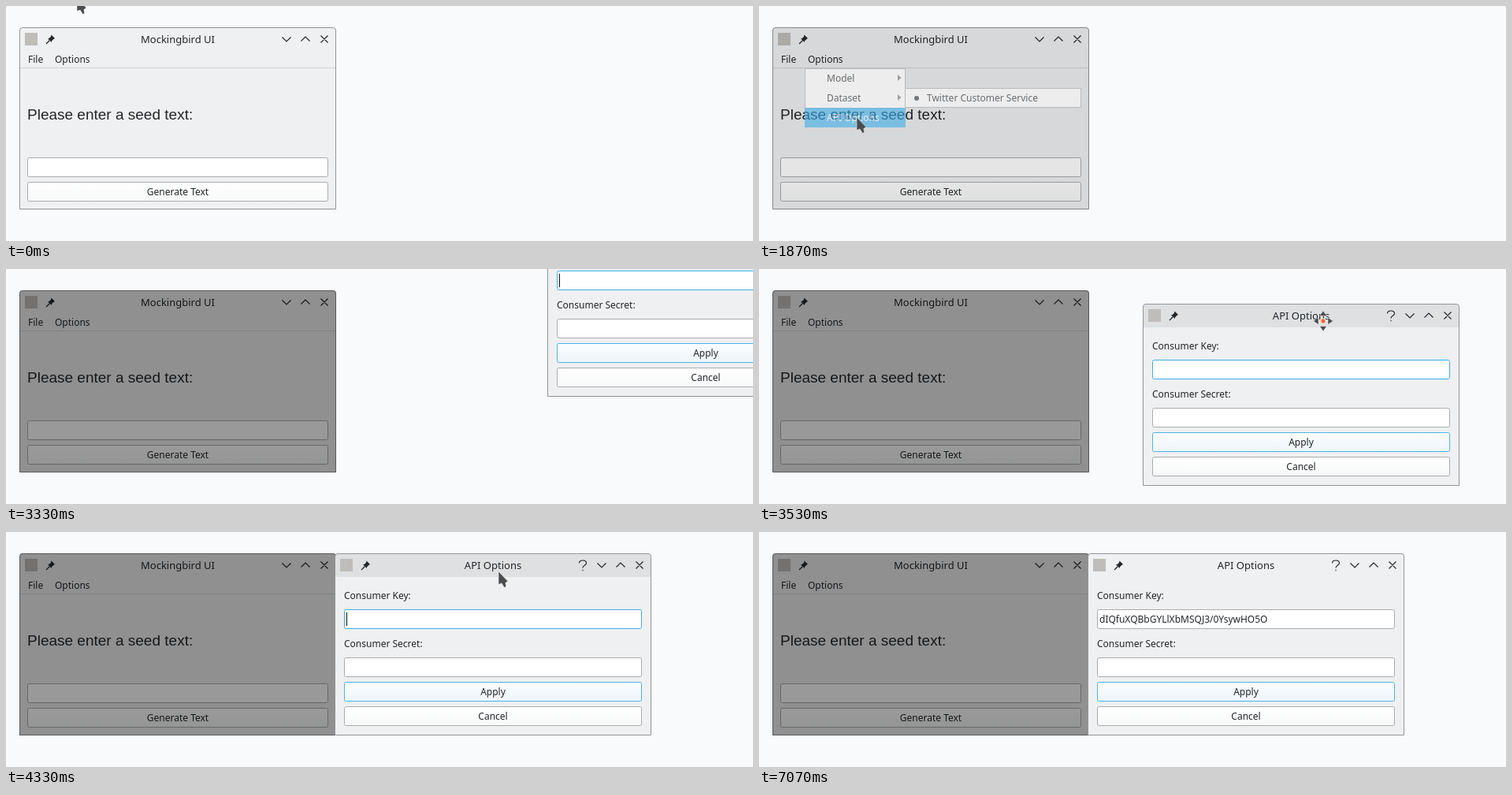
Write an HTML page that moves like this. It is 948x298 px and loops after 8 s.

```html
<!DOCTYPE html>
<html lang="en">
<head>
<meta charset="utf-8">
<title>API options dialog</title>
<style>
  html, body { margin: 0; width: 100%; height: 100%; overflow: hidden; background: #f9fafc; }
  svg { display: block; width: 948px; height: 298px; }
  text { font: 12px "Noto Sans", sans-serif; fill: #232629; white-space: pre; }
  .title { font-size: 13px; }
  .prompt { font: 19px "Liberation Sans", Arial, sans-serif; }
  .mid { text-anchor: middle; }
  .line { fill: none; stroke: #232629; stroke-width: 1.15; }
  .field { fill: #fff; stroke: #a9abad; }
  .button { fill: url(#plain); stroke: #a9abad; }
  .default { fill: url(#blue); stroke: #4db3e6; }
  .active .focus { stroke: #3daee9; }
  .bar { fill: #eff0f1; }
  .active .bar { fill: #dee0e2; }
  .caret { fill: #111; }
  .on { fill: #3daee9; }
  .back { fill: none; }
  .picked .back { fill: #3daee9; }
  .picked text { fill: #fcfcfc; }
  .picked .arrow { fill: #b9e0f6; }
  .arrow { fill: #7b7e81; }
  .popup { fill: #fcfcfc; stroke: #a5a8aa; }
  .ptr { fill: #4a4c4f; stroke: #fff; stroke-opacity: .6; stroke-width: .8; }
</style>
</head>
<body>
<svg id="stage" viewBox="0 0 948 298" xmlns="http://www.w3.org/2000/svg"></svg>
<script>
const FPS = 15, LOOP = 8000;

const text = (x, y, s, cls = '') => `<text x="${x}" y="${y}" class="${cls}">${s}</text>`;
const box = (x, y, w, h, cls) =>
  `<rect x="${x + .5}" y="${y + .5}" width="${w - 1}" height="${h - 1}" rx="2" class="${cls}"/>`;
const button = (x, y, w, s, cls) => box(x, y, w, 25, cls) + text(201, y + 17, s, 'mid');
const caret = (id, x, y) => `<rect id="${id}" x="${x}" y="${y}" width="1" height="17" class="caret"/>`;

const SHELL = 'M.5 230.5V4Q.5 .5 4 .5H398Q401.5 .5 401.5 4V230.5Z';

// Window frame, title bar and its buttons
const chrome = (title, help) => `
  <path d="${SHELL}" fill="#eff0f1"/>
  <path class="bar" d="M1 30V4Q1 1 4 1H398Q401 1 401 4V30Z"/>
  <path d="${SHELL}" fill="none" stroke="#929497"/>
  <rect x="7" y="7" width="16" height="16" fill="#bfbdba"/>
  <path d="M40.5 9.5L45 14L43.3 15L41 17.2L40.8 19L36 14.2L37.8 14L40 11.7Z" fill="#232629"/>
  <path d="M34 21L38.5 16.5" class="line"/>
  ${text(201, 20, title, 'title mid')}
  <path class="line" d="M333.5 12.5l5.5 5.5l5.5 -5.5M357.5 17.5l5.5 -5.5l5.5 5.5M382.5 10.5l9 9m0 -9l-9 9"/>
  ${help ? '<path class="line" d="M310.5 12.5C310.5 7.8 319.5 7.8 319.5 12.5C319.5 15.5 315 15 315 18.5M315 20.7v1.6"/>' : ''}`;

const ROW = 25, MENU_TOP = 79;
const row = (s, i) => {
  const y = MENU_TOP + i * ROW;
  return `<g class="row">
    <rect x="58" y="${y}" width="128" height="${ROW}" class="back"/>
    ${text(86, y + 17, s)}
    ${i < 2 ? `<path class="arrow" d="M176 ${y + 8}v8l4.5 -4z"/>` : ''}</g>`;
};

const stage = document.getElementById('stage');
stage.innerHTML = `
<defs>
  <linearGradient id="plain" x2="0" y2="1"><stop stop-color="#fff"/><stop offset="1" stop-color="#f7f8f8"/></linearGradient>
  <linearGradient id="blue" x2="0" y2="1"><stop stop-color="#fcfdfe"/><stop offset="1" stop-color="#edf5fa"/></linearGradient>
</defs>
<g id="main" transform="translate(17 27)">
  ${chrome('Mockingbird UI')}
  <rect x="1" y="51" width="400" height="1" fill="#d2d4d5"/>
  <rect id="optionsOn" x="41.5" y="30.5" width="52" height="21" class="on" stroke="#3389b8"/>
  ${text(11, 45, 'File')}
  <text id="options" x="45" y="45">Options</text>
  ${text(10, 117, 'Please enter a seed text:', 'prompt')}
  ${box(10, 165, 382, 25, 'field focus')}
  ${caret('mainCaret', 13, 169)}
  ${button(10, 196, 382, 'Generate Text', 'button')}
  <path id="dim" d="M0 231V4Q0 0 4 0H398Q402 0 402 4V231Z"/>
</g>
<g id="menu">
  <rect x="58.5" y="79.5" width="127" height="74" class="popup"/>
  ${['Model', 'Dataset', 'API Options'].map(row).join('')}
  <g id="submenu">
    <rect x="185.5" y="104.5" width="223" height="24" class="popup"/>
    <circle cx="200" cy="117" r="3" fill="#31363b"/>
    ${text(213, 121, 'Twitter Customer Service')}
  </g>
</g>
<g id="dialog">
  ${chrome('API Options', true)}
  ${text(12, 58, 'Consumer Key:')}
  ${box(12, 71, 378, 25, 'field focus')}
  <text id="key" x="15" y="88">dIQfuXQBbGYLlXbMSQJ3/0YsywHO5O</text>
  ${caret('keyCaret', 15, 75)}
  ${text(12, 119, 'Consumer Secret:')}
  ${box(12, 132, 378, 25, 'field')}
  ${button(12, 163, 378, 'Apply', 'default')}
  ${button(12, 194, 378, 'Cancel', 'button')}
</g>
<path id="arrow" class="ptr" d="M0 0V16.5L4 15L7.5 20.5L9.8 19L8.8 14.5L12 12.5Z"/>
<g id="grab">
  <path class="ptr" d="M0 -13L4.5 -6.5H-4.5ZM0 13L4.5 6.5H-4.5ZM-12.5 0L-6 -4.5V4.5ZM12.5 0L6 -4.5V4.5Z"/>
  <circle r="3.2" fill="#ef6a35" stroke="#fff" stroke-width=".8"/>
</g>
<path id="beam" d="M-3.5 -8.5H3.5M0 -8.5V8.5M-3.5 8.5H3.5" fill="none" stroke="#3c3e41" stroke-width="1.4"/>`;

const el = {};
stage.querySelectorAll('[id]').forEach(e => el[e.id] = e);
const rows = stage.querySelectorAll('.row');

const clamp = v => Math.min(1, Math.max(0, v));
const between = (n, a, b) => n >= a && n < b;

// Eased move between two points from tick a to tick b; sag bends it downwards
function glide(n, a, b, from, to, sag = 0) {
  const k = clamp((n - a) / (b - a)), e = Math.sin(k * Math.PI / 2);
  return [from[0] + (to[0] - from[0]) * e,
          from[1] + (to[1] - from[1]) * e + sag * Math.sin(k * Math.PI)];
}

const ABOVE = [90, -10], MENUBAR = [69, 63], OPTIONS = [76, 64], DATASET = [141, 117], API = [124, 141];
const DROP = [646, 49], REST = [625, 50], LEAVE = [720, 39], CORNER = [811, 227], FIELD = [684, 110];
const ENTRY = [687, -69], FAR = [366, 49], DOCK = [417, 27], GRIP = [229, 22];

function pointerAt(n) {
  if (n < 9) return glide(n, 0, 5, ABOVE, MENUBAR);
  if (n < 13) return glide(n, 9, 11, MENUBAR, OPTIONS);
  if (n < 18) return glide(n, 13, 18, OPTIONS, DATASET);
  if (n < 33) return glide(n, 18, 24, DATASET, API);
  if (between(n, 63, 66)) return glide(n, 62, 65, DROP, REST);
  if (between(n, 66, 69)) return glide(n, 66, 68, REST, LEAVE);
  if (between(n, 85, 98)) return glide(n, 85, 90, CORNER, FIELD);
}

function dialogAt(n) {
  if (n < 50) return null;
  return n < 57 ? glide(n, 50, 57, ENTRY, FAR, 40) : glide(n, 57, 62, FAR, DOCK);
}

const blink = (n, since) => n < since || (n - since >> 3) % 2 === 0;
const show = (e, on) => e.style.display = on ? '' : 'none';
function place(e, p) {
  show(e, p);
  if (p) e.setAttribute('transform', `translate(${Math.round(p[0])} ${Math.round(p[1])})`);
}

function drawMain(n, pointer) {
  const open = between(n, 13, 28);
  el.main.classList.toggle('active', between(n, 8, 28));
  show(el.mainCaret, between(n, 8, 13));
  show(el.optionsOn, open);
  el.options.style.fill = open ? '#fcfcfc' : '';
  el.dim.style.opacity = n < 28 ? 0 : .1 + .3 * clamp((n - 28) / 6);

  el.menu.style.opacity = Math.min(clamp((n - 12) / 2), clamp(1 - (n - 27) * .4));
  show(el.submenu, n >= 20);
  const hover = pointer ? Math.floor((pointer[1] - MENU_TOP) / ROW) : -1;
  rows.forEach((r, i) => r.classList.toggle('picked', i === hover));
}

function drawDialog(n, win) {
  const pasted = n >= 95;
  const active = between(n, 50, 76) || between(n, 91, 105);
  place(el.dialog, win);
  el.dialog.classList.toggle('active', active);
  show(el.key, pasted);
  show(el.keyCaret, active && blink(n, n < 76 ? 43 : 96));
  el.keyCaret.setAttribute('x', pasted ? 228 : 15);
}

function draw(n) {
  const pointer = pointerAt(n), win = dialogAt(n);
  const typing = n >= 89;
  drawMain(n, pointer);
  drawDialog(n, win);
  place(el.arrow, typing ? null : pointer);
  place(el.beam, typing ? pointer : null);
  place(el.grab, win && n < 63 ? [win[0] + GRIP[0], win[1] + GRIP[1]] : null);
}

const start = performance.now();
let last = -1;
function frame() {
  const t = (performance.now() - start) % LOOP;
  const n = Math.floor((t + 4) * FPS / 1000) % (LOOP * FPS / 1000);
  if (n !== last) draw(last = n);
  requestAnimationFrame(frame);
}
frame();
</script>
</body>
</html>
```
